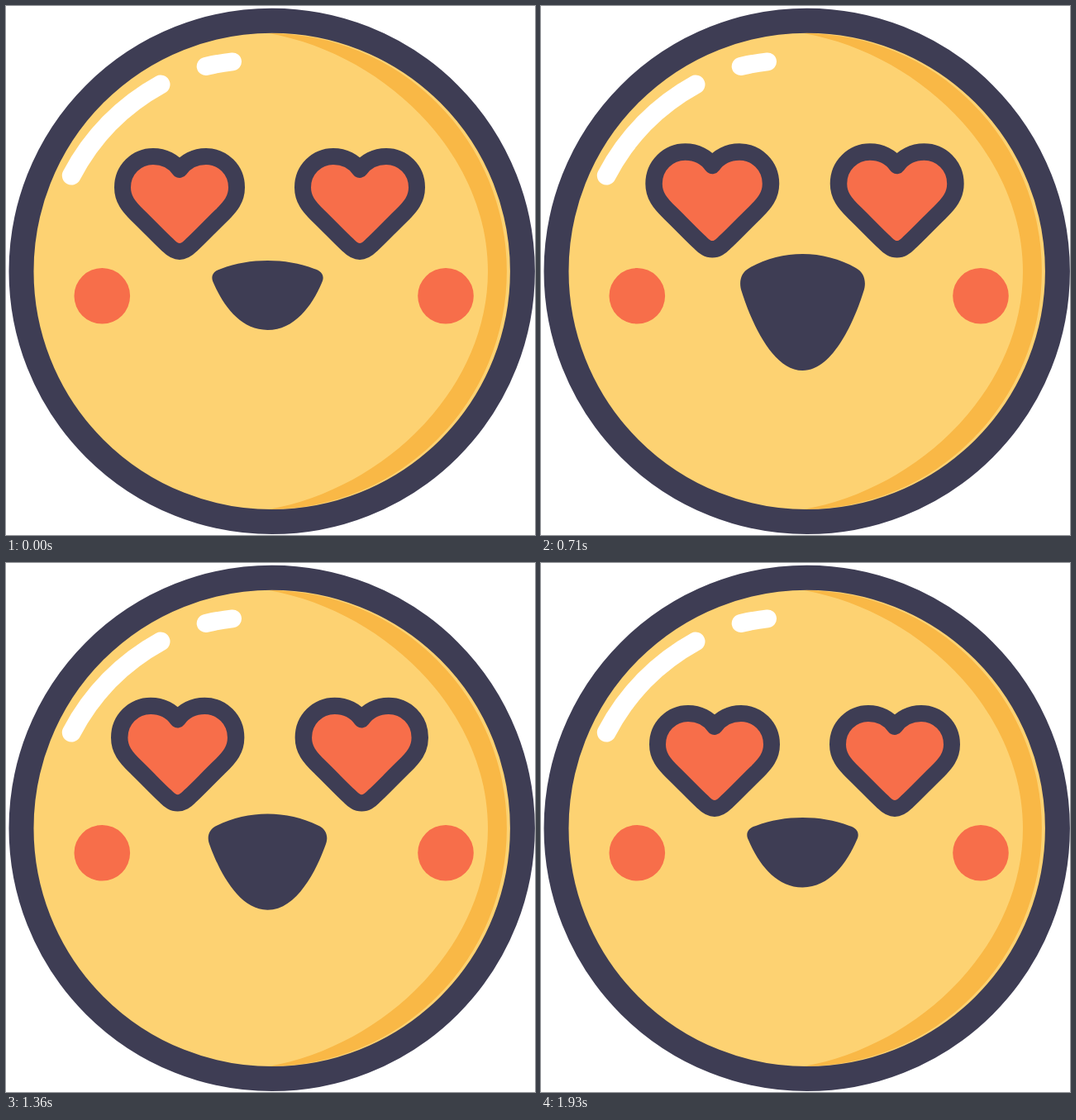
Write an HTML page that moves like this. It is 640 px wide and 640 px high and loops after 2000 ms.

```html
<!DOCTYPE html>
<html lang="en">
<head>
<meta charset="utf-8">
<title>Heart eyes</title>
<style>
  html, body { margin: 0; width: 100%; height: 100%; overflow: hidden; background: #fff; }
  svg { display: block; width: 100%; height: 100%; }
  .shine { fill: none; stroke: #fff; stroke-linecap: round; }
</style>
</head>
<body>
<svg viewBox="0 0 640 640">
  <defs>
    <g id="heart" fill="#f76e4a" stroke="#3e3d54" stroke-width="20" stroke-linejoin="round">
      <path d="M0-41.5 C-7-51.5-19-57.5-32-57.5 C-52-57.5-69-41.5-69-20 C-69-6-62 3-50 14.5
        C-36 28-24 41-14 50 C-9 55-5.5 57.5 0 57.5 C5.5 57.5 9 55 14 50
        C24 41 36 28 50 14.5 C62 3 69-6 69-20 C69-41.5 52-57.5 32-57.5 C19-57.5 7-51.5 0-41.5Z"/>
    </g>
  </defs>
  <circle cx="321.7" cy="320.9" r="303" fill="#fdd272"/>
  <path fill="#f9b846" d="M318 33 C458 58 583 179 583 321 C583 463 458 584 318 609 A288 288 0 0 0 318 33Z"/>
  <circle cx="321.7" cy="320.9" r="303.2" fill="none" stroke="#3e3d54" stroke-width="30"/>
  <path class="shine" stroke-width="23" d="M79.3 205 A266 266 0 0 1 187 95"/>
  <path class="shine" stroke-width="22" d="M241.7 73 A260 260 0 0 1 274 67.4"/>
  <g fill="#f76e4a">
    <circle cx="116.3" cy="350.8" r="33.8"/>
    <circle cx="532" cy="350.8" r="33.8"/>
  </g>
  <path id="mouth" fill="#3e3d54"/>
  <g id="eyes">
    <use href="#heart" x="-109"/>
    <use href="#heart" x="109"/>
  </g>
</svg>
<script>
const LOOP = 2000, STEPS = 28;
const mouth = document.getElementById('mouth');
const eyes = document.getElementById('eyes');

const clamp = p => Math.min(1, Math.max(0, p));
const smooth = p => p * p * (3 - 2 * p);

// Times at which the hearts are in turn smallest and largest
const BEATS = [0, 4, 8.6, 13, 17.65, 22.3, 27];

function heartScale(step) {
  const n = BEATS.findLastIndex(t => t <= step);
  if (n === BEATS.length - 1) return 1;
  const p = smooth((step - BEATS[n]) / (BEATS[n + 1] - BEATS[n]));
  return 1 + 0.104 * (n % 2 ? 1 - p : p);
}

// The hearts spring up, settle, then drop back
function heartLift(step) {
  const swing = clamp(1 - step / 20) * Math.cos(step * Math.PI / 5);
  const hold = 1 - smooth(clamp((step - 23) / 4));
  return 8.2 * (1 - swing) * hold;
}

function mouthOpening(step) {
  const peak = 1.125, turn = 13;
  if (step < turn) return peak * (1 - (1 - step / turn) ** 1.5);
  const p = (step - turn) / (STEPS - turn);
  return peak * (1 - p * (1 + p - p * p));
}

// Offsets are measured from the mouth's centre line
function mouthPath(open) {
  const mid = 316.5;
  const top = 308 - 8 * open, bottom = 392 + 49 * open;
  const side = 65.5 + 8 * open, sideY = 335 + 11 * open;
  const corner = 56.5 + 8 * open, cornerY = 318 - open;
  const half = [
    [side, sideY],
    [side + 4, sideY - 8 - 3 * open], [corner + 9.5 + 1.5 * open, cornerY + 2.5 + 3.5 * open], [corner, cornerY],
    [38.5 + 7 * open, top + 3 + 3 * open], [19.5 + 3 * open, top], [0, top],
    [53.5 + 10 * open, 363 + 15 * open], [32.5 + 5 * open, bottom], [0, bottom]
  ];
  const left = i => `${mid - half[i][0]} ${half[i][1]} `;
  const right = i => `${mid + half[i][0]} ${half[i][1]} `;
  const curve = (side, ...ids) => 'C' + ids.map(side).join('');
  return 'M' + left(0) + curve(left, 1, 2, 3) + curve(left, 4, 5, 6) +
    curve(right, 5, 4, 3) + curve(right, 2, 1, 0) +
    curve(right, 7, 8, 9) + curve(left, 8, 7, 0) + 'Z';
}

function draw() {
  // Steps begin on whole hundredths of a second
  const time = Math.floor((performance.now() % LOOP) / 10) * 10;
  const step = Math.floor((time + 5) * STEPS / LOOP) % STEPS;
  const y = 239.5 - heartLift(step);
  eyes.setAttribute('transform', `translate(319 ${y}) scale(${heartScale(step)})`);
  mouth.setAttribute('d', mouthPath(mouthOpening(step)));
  requestAnimationFrame(draw);
}
draw();
</script>
</body>
</html>
```
